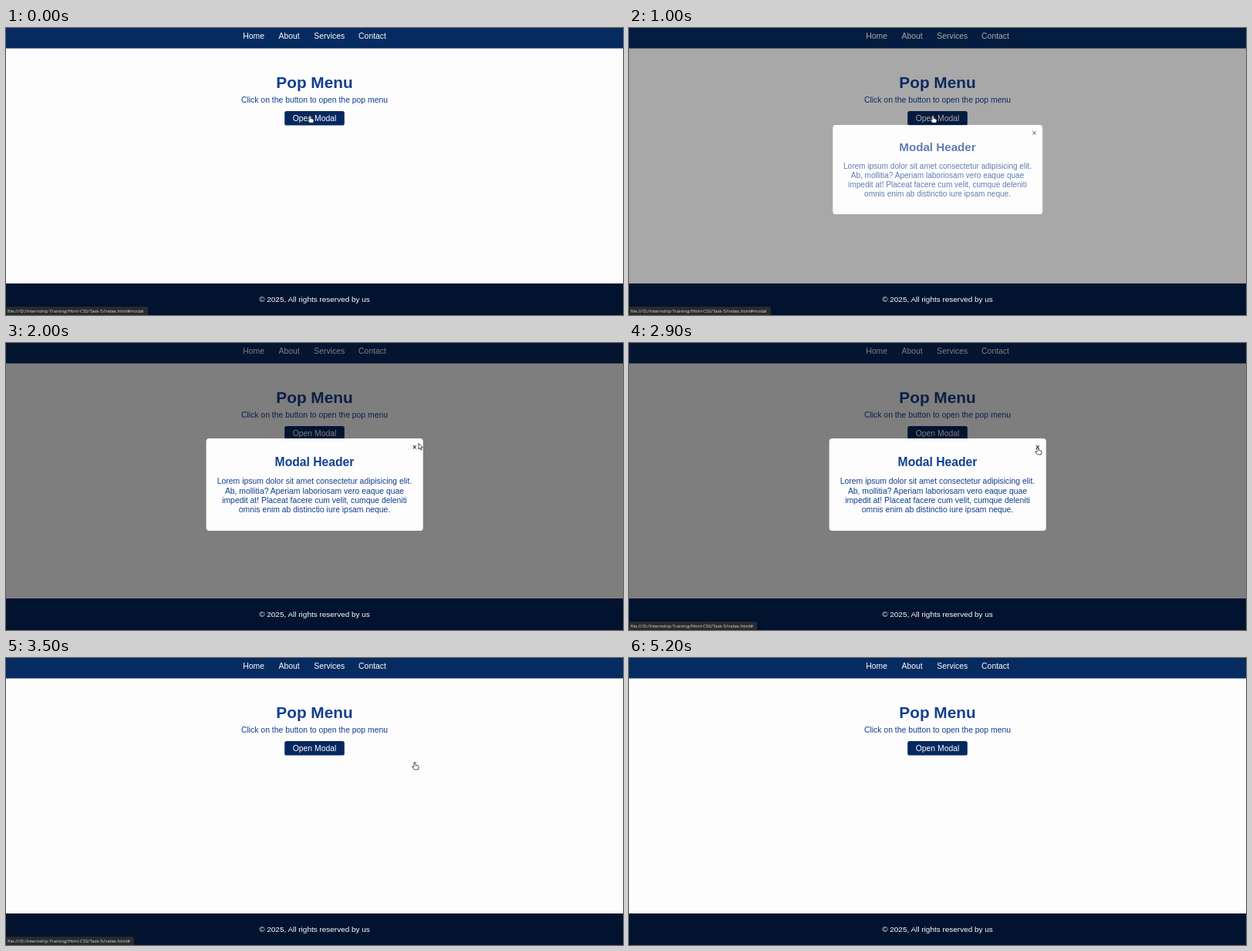
An HTML page for the animation above (5300 ms loop, 800 by 373 pixels).

```html
<!DOCTYPE html>
<html lang="en">
<head>
<meta charset="utf-8">
<title>Pop Menu</title>
<style>
  html, body { margin: 0; width: 100%; height: 100%; overflow: hidden; background: #fdfdfd; }
  svg { display: block; width: 100vw; height: 100vh; }
  text { font: 10.4px "Liberation Sans", Arial, sans-serif; }
  .mid { text-anchor: middle; }
  .blue { fill: #133f91; }
  .white { fill: #fff; }
  #title { font-size: 20.8px; font-weight: bold; }
  #heading { font-size: 15.7px; font-weight: bold; }
  #copyright { font-size: 9.98px; }
  #url { font: 5.93px "Open Sans", sans-serif; fill: #dcdcdc; }
  #cursor path { fill: #fff; stroke: #111; stroke-width: .75; stroke-linejoin: round; }
</style>
</head>
<body>
<svg viewBox="0 0 800 373">
  <rect width="800" height="373" fill="#fdfdfd"/>
  <rect width="800" height="26.5" fill="#062b61"/>
  <g class="white">
    <text x="307.2" y="14">Home</text>
    <text x="353.6" y="14">About</text>
    <text x="399.3" y="14">Services</text>
    <text x="457.1" y="14">Contact</text>
  </g>
  <text id="title" class="mid blue" x="400" y="78">Pop Menu</text>
  <text class="mid blue" x="400" y="97">Click on the button to open the pop menu</text>
  <rect x="361.2" y="108" width="77.6" height="18.6" rx="2.6" fill="#062860"/>
  <text class="mid white" x="400" y="121">Open Modal</text>

  <g id="overlay">
    <rect width="800" height="373" opacity=".5"/>
    <g id="modal">
      <rect x="259.6" y="124" width="281.2" height="120" rx="4" fill="#fdfdfd"/>
      <text class="mid" x="529.7" y="139">×</text>
      <g class="mid blue">
        <text id="heading" x="400" y="159.5">Modal Header</text>
        <text x="400" y="183.4">Lorem ipsum dolor sit amet consectetur adipisicing elit.</text>
        <text x="400" y="195.7">Ab, mollitia? Aperiam laboriosam vero eaque quae</text>
        <text x="400" y="208">impedit at! Placeat facere cum velit, cumque deleniti</text>
        <text x="400" y="220.3">omnis enim ab distinctio iure ipsam neque.</text>
      </g>
    </g>
  </g>

  <rect y="332" width="800" height="41" fill="#01132f"/>
  <text id="copyright" class="mid white" x="400" y="356.4">© 2025, All rights reserved by us</text>

  <g id="status">
    <path id="bubble" fill="#2a2b2d"/>
    <text id="url" x="2" y="369.8"></text>
  </g>
  <g id="cursor">
    <path id="hand" d="M-1 1Q0-.7 1 1V4.2L4 5Q5.4 5.4 5.1 7L4.5 10H-.6L-3.4 6.4Q-3.2 5.2-1 6.6Z"/>
    <path id="arrow" d="M0 0V7.6L1.8 6L3 8.8L4.2 8.3L3 5.6H5.4Z"/>
  </g>
</svg>
<script>
const LOOP = 5300, STEP = 100, FADE = 300;
const OPEN = 883, CLOSE = 3215;
const PAGE = "file:///D:/Internship Training/Html-CSS/Task-5/index.html#";
// time, x, y of the pointer's hot spot
const route = [[0, 394, 113.3], [1300, 394, 113.3], [1800, 535, 130.3], [2000, 535, 130.3],
  [2200, 538, 132], [2400, 531, 134.5], [2700, 530, 135], [3600, 530, 135], [3700, 529, 135], [LOOP, 529, 135]];
const $ = id => document.getElementById(id);
const show = (id, on) => $(id).setAttribute("visibility", on ? "inherit" : "hidden");
const within = (t, from, to) => t >= from && t < to;

// CSS "ease" curve, cubic-bezier(.25, .1, .25, 1)
function ease(x) {
  if (x <= 0 || x >= 1) return x <= 0 ? 0 : 1;
  const bezier = (u, a, b) => 3 * u * (1 - u) ** 2 * a + 3 * u * u * (1 - u) * b + u ** 3;
  let low = 0, high = 1;
  for (let i = 0; i < 20; i++) {
    const u = (low + high) / 2;
    if (bezier(u, .25, .25) < x) low = u; else high = u;
  }
  return bezier(low, .1, 1);
}

function pointer(t) {
  const i = route.findIndex(p => p[0] > t);
  const [t0, x0, y0] = route[i - 1], [t1, x1, y1] = route[i];
  const k = (t - t0) / (t1 - t0), s = k * k * (3 - 2 * k);
  return [x0 + (x1 - x0) * s, y0 + (y1 - y0) * s];
}

function draw(t) {
  const shown = ease((t - OPEN) / FADE) - ease((t - CLOSE) / FADE);
  $("overlay").setAttribute("opacity", shown);
  $("modal").setAttribute("transform",
    `translate(400 184) scale(${.9 + .1 * shown}) translate(-400 -184)`);

  const onOpen = t < 1900;
  show("status", onOpen || within(t, 2500, 3800));
  $("url").textContent = PAGE + (onOpen ? "modal" : "");
  $("bubble").setAttribute("d", `M0 362.3H${onOpen ? 182 : 164}q2 0 2 2V373H0Z`);

  const hand = t < 1400 || within(t, 2400, 3600);
  show("cursor", t < 4000);
  show("hand", hand);
  show("arrow", !hand);
  $("cursor").setAttribute("transform", `translate(${pointer(t)})`);
}

function tick() {
  draw(Math.floor(performance.now() % LOOP / STEP) * STEP);
  requestAnimationFrame(tick);
}
tick();
</script>
</body>
</html>
```
